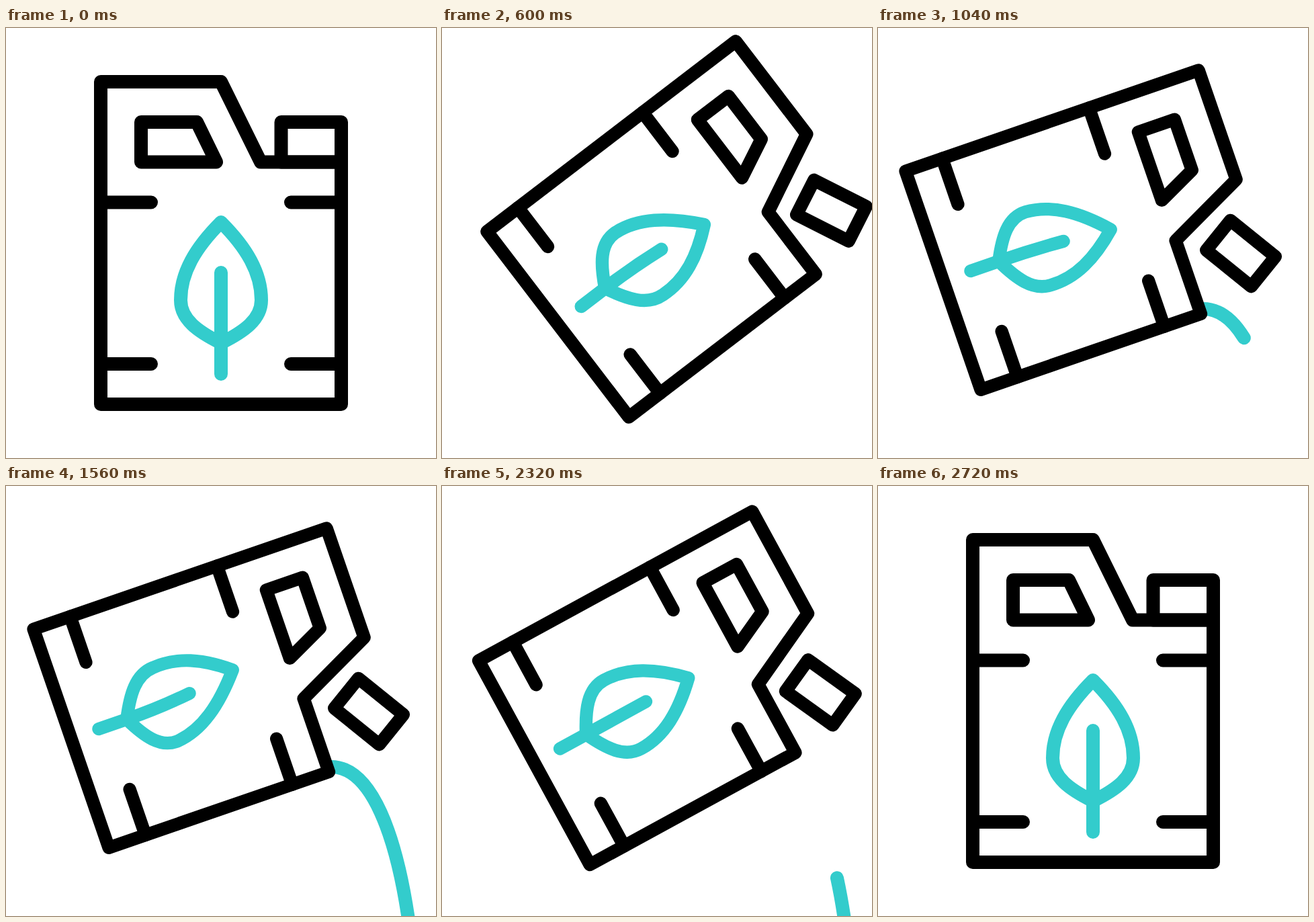
An HTML page that plays this animation: 640 px wide and 640 px high, repeating every 3000 ms.

```html
<!DOCTYPE html>
<html lang="en">
<head>
<meta charset="utf-8">
<title>Pouring canister</title>
<style>
  html, body { margin: 0; width: 100%; height: 100%; overflow: hidden; background: #fff; }
  svg { display: block; width: 100vw; height: 100vh; }
  path { fill: none; stroke: #000; stroke-width: 20; stroke-linecap: round; stroke-linejoin: round; }
  .teal { stroke: #3cc; }
</style>
</head>
<body>
<svg viewBox="0 0 640 640">
  <path id="stream" class="teal" d="M484 418C545 418 581 523 599 645L613 735"/>
  <g id="can">
    <path d="M141 80H320L379 199.500H499V560H141Z"/>
    <path d="M201 140H284L313 199.500H201Z"/>
    <path d="M141 259.500H216M424 259.500H499M141 500H216M424 500H499"/>
    <path id="cap" d="M409.500 140H499V199.500H409.500Z"/>
    <path id="leaf" class="teal"/>
  </g>
</svg>
<script>
const LOOP = 3000, STEP = 40;
const [stream, can, cap, leaf] = ['stream', 'can', 'cap', 'leaf'].map(id => document.getElementById(id));
const streamLen = stream.getTotalLength();

const ease = (t, from, to) => {
  const u = Math.min(1, Math.max(0, (t - from) / (to - from)));
  return u * u * (3 - 2 * u);
};

// Eased value along a list of [time, value] keys.
const track = (keys, t) => {
  let v = keys[0][1];
  for (let i = 1; i < keys.length; i++) {
    v += (keys[i][1] - keys[i - 1][1]) * ease(t, keys[i - 1][0], keys[i][0]);
  }
  return v;
};

const TILT = [[200, 0], [800, 1], [2200, 1], [2720, 0]];
const OPEN = [[200, 0], [760, 1], [2160, 1], [2720, 0]];
const SWAY = [[200, 0], [800, 20], [1520, -19], [2440, 0]];

// The leaf bends sideways with the square of the height above its base.
function leafPath(sway) {
  const pt = (x, y) => {
    const h = Math.max(0, 468 - y) / 179;
    return `${(x + sway * h * h).toFixed(2)} ${y} `;
  };
  const side = d =>
    'M' + pt(320, 289) +
    'C' + pt(320 + 38 * d, 327) + pt(320 + 60 * d, 364) + pt(320 + 60 * d, 405) +
    'C' + pt(320 + 60 * d, 434) + pt(320 + 34 * d, 452) + pt(320, 469);
  return side(-1) + side(1) + 'M320 515L320 468Q320 416 ' + pt(320, 364);
}

function draw(t) {
  const p = track(TILT, t), q = track(OPEN, t);
  can.setAttribute('transform',
    `translate(${141 - 100 * p} ${560 - 347 * p}) rotate(${71 * p}) scale(${1 - 0.039 * p}) translate(-141 -560)`);
  cap.setAttribute('transform',
    `translate(${-q} ${-40 * q}) rotate(${-32.1 * q} 409.5 199.5)`);
  leaf.setAttribute('d', leafPath(track(SWAY, t)));

  const head = streamLen * ease(t, 800, 1600);
  const tail = streamLen * ease(t, 1880, 2680);
  const len = head - tail;
  stream.style.display = len > 0.5 ? '' : 'none';
  stream.style.strokeDasharray = `${len} 2000`;
  stream.style.strokeDashoffset = -tail;
}

function tick() {
  const t = performance.now() % LOOP;
  draw(Math.floor(t / STEP) * STEP);
  requestAnimationFrame(tick);
}
tick();
</script>
</body>
</html>
```
